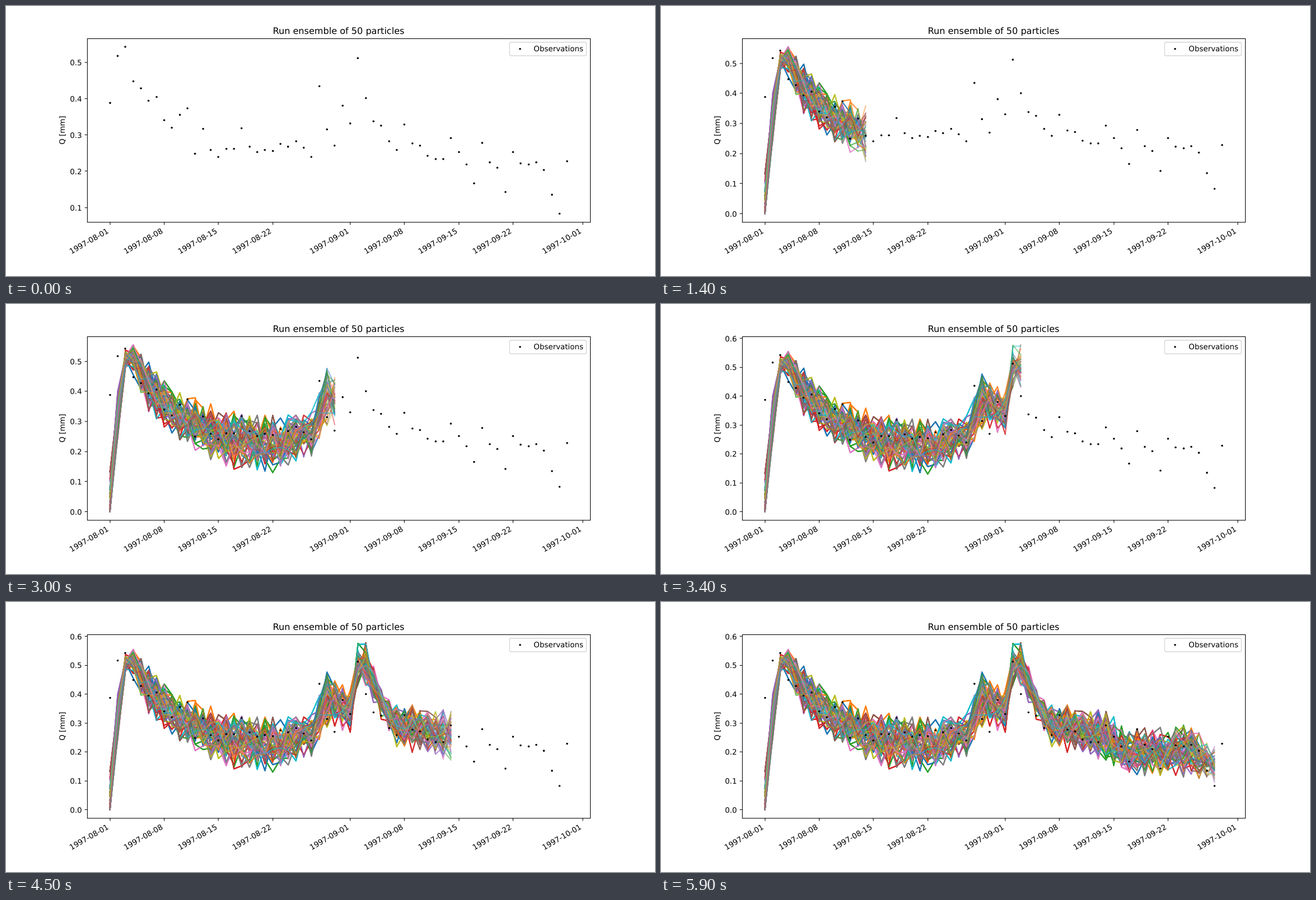
Write an HTML page with a canvas that moves like this. It is 1159 px wide and 483 px high and loops after 6000 ms.

```html
<!DOCTYPE html>
<html lang="en">
<head>
<meta charset="utf-8">
<title>Run ensemble of 50 particles</title>
<style>
  html, body { margin: 0; width: 100%; height: 100%; overflow: hidden; background: #fff; }
  canvas { display: block; }
</style>
</head>
<body>
<canvas id="chart" width="1159" height="483"></canvas>
<script>
// The figure is laid out on 1200 by 500 units at 100 dpi and scaled to the stage.
const ctx = document.getElementById('chart').getContext('2d');
ctx.scale(1159 / 1200, 483 / 500);
ctx.textRendering = 'geometricPrecision';

const FRAME_MS = 100, FRAMES = 60, PARTICLES = 50, PASSES = 8;
const LEFT = 150, RIGHT = 1080, TOP = 60, BOTTOM = 400, MARGIN = 0.05;
const PT = 100 / 72;
const COLORS = ['#1f77b4', '#ff7f0e', '#2ca02c', '#d62728', '#9467bd',
                '#8c564b', '#e377c2', '#7f7f7f', '#bcbd22', '#17becf'];

// Daily observations in thousandths of a millimetre.
const observed = [
  388, 517, 543, 448, 428, 394, 405, 340, 319, 355, 373, 249, 316, 259, 240,
  261, 261, 318, 268, 252, 258, 255, 275, 267, 282, 264, 240, 435, 315, 270,
  380, 331, 512, 401, 337, 325, 282, 258, 328, 276, 271, 243, 233, 233, 292,
  252, 218, 166, 278, 224, 209, 142, 252, 222, 218, 224, 203, 135, 83, 228];

// Key points of the ensemble: day, centre, half range.
const keys = [
  [0, 30, 105], [1, 322, 78], [2, 509, 28], [3, 505, 50], [5, 415, 82],
  [8, 330, 68], [15, 240, 88], [21, 225, 95], [26, 258, 73], [28, 381, 95],
  [31, 340, 72], [32, 505, 71], [33, 504, 74], [35, 364, 51], [37, 290, 72],
  [44, 256, 84], [47, 200, 70], [55, 203, 80], [58, 156, 62]];

function seeded(seed) {
  return () => {
    seed = (seed + 0x6D2B79F5) | 0;
    let t = Math.imul(seed ^ (seed >>> 15), 1 | seed);
    t = (t + Math.imul(t ^ (t >>> 7), 61 | t)) ^ t;
    return ((t ^ (t >>> 14)) >>> 0) / 4294967296;
  };
}
const random = seeded(1997);

function rangeAt(day) {
  const next = Math.max(1, keys.findIndex(key => key[0] >= day));
  const [d0, centre0, half0] = keys[next - 1];
  const [d1, centre1, half1] = keys[next];
  const f = (day - d0) / (d1 - d0);
  const wobble = f === 0 || f === 1 ? 1 : 0.85 + 0.3 * random();
  return [centre0 + (centre1 - centre0) * f, (half0 + (half1 - half0) * f) * wobble];
}

// Bell-shaped samples, stretched so that they fill the day's range.
function simulateDay(day) {
  const [centre, half] = rangeAt(day);
  const samples = Array.from({ length: PARTICLES }, () => random() + random() + random());
  const low = Math.min(...samples), high = Math.max(...samples);
  return samples.map(s => Math.max(0, centre + half * (2 * (s - low) / (high - low) - 1)));
}
const days = Array.from({ length: FRAMES - 1 }, (_, day) => simulateDay(day));

const DAY_WIDTH = (RIGHT - LEFT) / (1 + 2 * MARGIN) / (observed.length - 1);
const FIRST_X = LEFT + (RIGHT - LEFT) * MARGIN / (1 + 2 * MARGIN);
const xOf = day => FIRST_X + DAY_WIDTH * day;
const pixel = v => Math.floor(v) + 0.5;

function text(str, x, y, { size = 10, align = 'left', angle = 0 } = {}) {
  ctx.save();
  ctx.translate(x, y);
  ctx.rotate(-angle * Math.PI / 180);
  ctx.font = `${size * PT}px "DejaVu Sans", sans-serif`;
  ctx.textAlign = align;
  ctx.fillStyle = '#000';
  ctx.fillText(str, 0, 0);
  ctx.restore();
}

function line(x1, y1, x2, y2) {
  ctx.beginPath();
  ctx.moveTo(x1, y1);
  ctx.lineTo(x2, y2);
  ctx.stroke();
}

function dot(x, y) {
  ctx.beginPath();
  ctx.arc(pixel(x), pixel(y), 1.85, 0, 2 * Math.PI);
  ctx.fillStyle = '#000';
  ctx.fill();
}

// Each step plots all runs again on top of the earlier ones, so older parts turn opaque.
function drawEnsemble(count, yOf) {
  ctx.save();
  ctx.globalAlpha = 0.5;
  ctx.lineWidth = 1.5 * PT;
  ctx.lineJoin = 'round';
  ctx.lineCap = 'square';
  for (let n = Math.max(2, count - PASSES + 1); n <= count; n++) {
    for (let p = 0; p < PARTICLES; p++) {
      ctx.beginPath();
      for (let day = 0; day < n; day++) ctx.lineTo(xOf(day), yOf(days[day][p]));
      ctx.strokeStyle = COLORS[p % COLORS.length];
      ctx.stroke();
    }
  }
  ctx.restore();
}

function drawAxes(min, max, yOf) {
  ctx.strokeStyle = '#000';
  ctx.lineWidth = 0.8 * PT;
  ctx.strokeRect(pixel(LEFT), pixel(TOP), RIGHT - LEFT, BOTTOM - TOP);

  for (let value = 0; value <= 600; value += 100) {
    if (value < min || value > max) continue;
    const y = yOf(value);
    line(LEFT - 4.4, pixel(y), LEFT, pixel(y));
    text((value / 1000).toFixed(1), LEFT - 7 * PT, y + 5.3, { align: 'right' });
  }

  for (const day of [0, 7, 14, 21, 31, 38, 45, 52, 61]) {
    const x = xOf(day);
    const date = new Date(Date.UTC(1997, 7, 1 + day)).toISOString().slice(0, 10);
    line(pixel(x), BOTTOM, pixel(x), BOTTOM + 5.4);
    text(date, x - 1.5, BOTTOM + 19.4, { align: 'right', angle: 30 });
  }

  text('Q [mm]', 109, (TOP + BOTTOM) / 2, { align: 'center', angle: 90 });
  text('Run ensemble of 50 particles', (LEFT + RIGHT) / 2, TOP - 6 * PT, { size: 12, align: 'center' });
}

function drawLegend() {
  ctx.beginPath();
  ctx.roundRect(931.2, 67, 141.9, 25.1, 2.8);
  ctx.fillStyle = 'rgba(255,255,255,0.8)';
  ctx.fill();
  ctx.strokeStyle = 'rgba(204,204,204,0.8)';
  ctx.lineWidth = PT;
  ctx.stroke();
  dot(950.7, 79.2);
  text('Observations', 975.7, 84);
}

function draw(count) {
  const shown = observed.concat(...days.slice(0, count));
  const low = Math.min(...shown), high = Math.max(...shown);
  const margin = (high - low) * MARGIN;
  const min = low - margin, max = high + margin;
  const yOf = v => BOTTOM - (v - min) / (max - min) * (BOTTOM - TOP);

  ctx.fillStyle = '#fff';
  ctx.fillRect(0, 0, 1200, 500);
  drawEnsemble(count, yOf);
  observed.forEach((v, day) => dot(xOf(day), yOf(v)));
  drawAxes(min, max, yOf);
  drawLegend();
}

const start = performance.now();
let current = -1;
function tick() {
  const step = Math.floor((performance.now() - start) / FRAME_MS) % FRAMES;
  if (step !== current) draw(current = step);
  requestAnimationFrame(tick);
}
tick();
</script>
</body>
</html>
```
